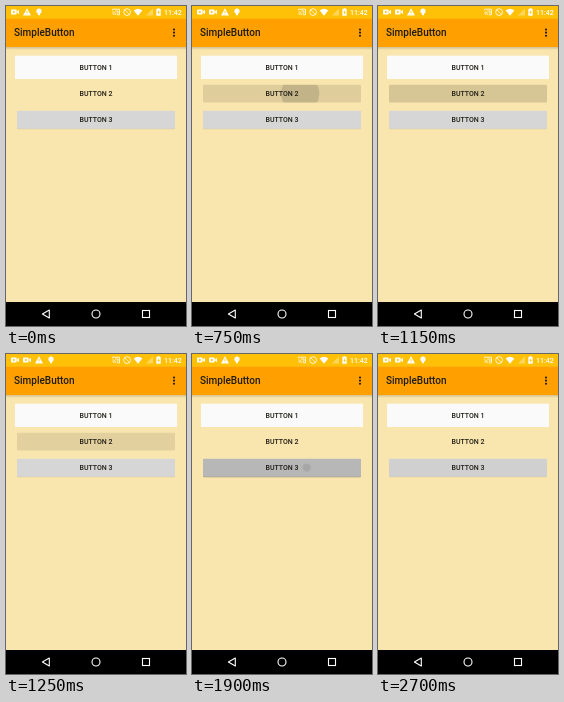
Recreate the animation shown at these times as an HTML page. Size 180 px wide and 320 px high, loop 2900 ms.

```html
<!DOCTYPE html>
<html lang="en">
<head>
<meta charset="utf-8">
<title>SimpleButton</title>
<style>
  html, body { margin: 0; width: 100%; height: 100%; overflow: hidden; background: #f9e6ae; }
  svg { display: block; width: 100vw; height: 100vh; }
  text { font-family: Roboto, sans-serif; font-weight: 500; fill: #1f1c14; }
  .label { font-size: 7px; text-anchor: middle; }
  .icon { fill: #fff; }
  .line { fill: none; stroke: #fff; }
</style>
</head>
<body>
<svg viewBox="0 0 180 320">
  <defs>
    <linearGradient id="shade" x2="0" y2="1">
      <stop offset="0" stop-color="#000" stop-opacity=".22"/>
      <stop offset="1" stop-color="#000" stop-opacity="0"/>
    </linearGradient>
    <filter id="soft" x="-5%" y="-30%" width="110%" height="160%"><feGaussianBlur stdDeviation=".6"/></filter>
    <clipPath id="clip2"><rect x="11" y="78.7" width="158" height="17.8" rx="1"/></clipPath>
    <clipPath id="clip3"><rect x="11" y="104.7" width="158" height="18" rx="1"/></clipPath>
    <g id="camera"><rect x="-4" y="-2.5" width="5.6" height="5" rx=".7"/><path d="M1.8-.6 4-2.2V2.2L1.8.6Z"/><circle cx="-1.2" r="1" fill="#ffc107"/></g>
  </defs>

  <rect width="180" height="320" fill="#f9e6ae"/>
  <rect y="40" width="180" height="4" fill="url(#shade)"/>
  <rect y="12" width="180" height="29" fill="#ffa000"/>
  <rect width="180" height="12.7" fill="#ffc107"/>

  <g class="icon">
    <use href="#camera" x="9" y="6"/>
    <use href="#camera" x="21" y="6" id="extra"/>
    <g id="notes">
      <path d="M21 2.2 25 9.5H17Z"/>
      <path d="M21 4.8V7M21 7.7V8.5" stroke="#ffc107" stroke-width=".8"/>
      <circle cx="33" cy="5" r="2.6"/><path d="M31.5 6.5H34.5L33.8 9.2H32.2Z"/>
    </g>
    <path d="M158 0" />
    <path class="line" stroke-width=".8" d="M106.5 4.3V3.2H113.5V8.8H110.8M106.5 5.8A3 3 0 0 1 109.5 8.8M106.5 7.5A1.3 1.3 0 0 1 107.8 8.8M109 5H112V7.2H110.8"/>
    <path class="line" stroke-width=".8" d="M118.5 3.6 123.5 8.6M124.5 6.1A3.4 3.4 0 1 1 117.7 6.1A3.4 3.4 0 1 1 124.5 6.1"/>
    <path d="M127.7 4.4Q132 1.2 136.3 4.4L132 9.8Z"/>
    <path d="M147 2.5V9.5H140Z" opacity=".35"/>
    <path d="M151.4 2.2H153.6V3H154.7V9.8H150.3V3H151.4Z"/>
    <path d="M153 4 151.4 6.8H152.4V8.8L153.8 6H152.8Z" fill="#ffc107"/>
  </g>
  <text x="158" y="8.6" font-size="7" style="fill:#fff">11:42</text>

  <text x="8" y="30.4" font-size="10">SimpleButton</text>
  <g fill="#1f1400"><circle cx="168" cy="23.5" r="1.05"/><circle cx="168" cy="26.6" r="1.05"/><circle cx="168" cy="29.7" r="1.05"/></g>

  <rect x="9" y="49.7" width="162" height="23.3" fill="#fafafa"/>

  <g clip-path="url(#clip2)">
    <rect id="tint2" x="11" y="78" width="158" height="19"/>
    <circle id="ripple2" cy="87.5"/>
  </g>

  <rect id="shadow3" x="11" y="105.2" width="158" height="18" rx="1" filter="url(#soft)"/>
  <rect x="11" y="104.7" width="158" height="18" rx="1" fill="#d7d7d7"/>
  <g clip-path="url(#clip3)">
    <rect id="tint3" x="11" y="104" width="158" height="20"/>
    <circle id="ripple3" cy="113.6"/>
  </g>

  <text class="label" x="90" y="64.1">BUTTON 1</text>
  <text class="label" x="90" y="90.1">BUTTON 2</text>
  <text class="label" x="90" y="116.1">BUTTON 3</text>

  <rect y="296" width="180" height="24"/>
  <g class="line" stroke-width="1.1">
    <path d="M43.3 304V312L36.4 308Z" stroke-linejoin="round"/>
    <circle cx="90" cy="308" r="4"/>
    <rect x="136.5" y="304.5" width="7" height="7"/>
  </g>
</svg>
<script>
const LOOP = 2900, STEP = 50, REACH = 79.5, CENTER = 90;
const $ = id => document.getElementById(id);

// Each track is a list of [time, value] with straight runs between.
const tracks = {
  tint2: [[100, 0], [500, .105], [1100, .105], [1150, .14], [1450, 0]],
  ripple2: [[400, 0], [500, .13], [1100, .13], [1150, 0]],
  tint3: [[0, .005], [1500, .005], [1650, .075], [1900, .15], [2200, .15], [2550, .03], [2899, .03]],
  ripple3: [[1735, 0], [1800, .085], [2200, .085], [2500, 0]],
  shadow3: [[0, .12], [1600, .12], [1650, .2], [2000, .45], [2200, .45], [2500, .12]]
};

function valueAt(track, t) {
  const i = track.findIndex(key => key[0] > t);
  if (i < 0) return track[track.length - 1][1];
  if (i === 0) return track[0][1];
  const [t0, a] = track[i - 1], [t1, b] = track[i];
  return a + (b - a) * (t - t0) / (t1 - t0);
}

// The ripple drifts from the touch point to the button's center as it grows.
function spread(id, touch, elapsed) {
  const p = Math.min(1, .24 * Math.pow(Math.max(0, elapsed) / 350, 2.05));
  $(id).setAttribute("r", REACH * p);
  $(id).setAttribute("cx", touch + (CENTER - touch) * p);
}

function render(now) {
  const t = Math.floor(now % LOOP / STEP) * STEP;
  for (const id in tracks) $(id).setAttribute("opacity", valueAt(tracks[id], t));
  spread("ripple2", 114, Math.min(t, 1000) - 400);
  spread("ripple3", 116, t - 1735 + Math.max(0, t - 2200));
  $("extra").setAttribute("opacity", t < 50 ? 0 : 1);
  $("notes").setAttribute("transform", `translate(${t < 50 ? 0 : 12})`);
}

const start = performance.now();
function tick() {
  render(performance.now() - start);
  requestAnimationFrame(tick);
}
tick();
</script>
</body>
</html>
```
